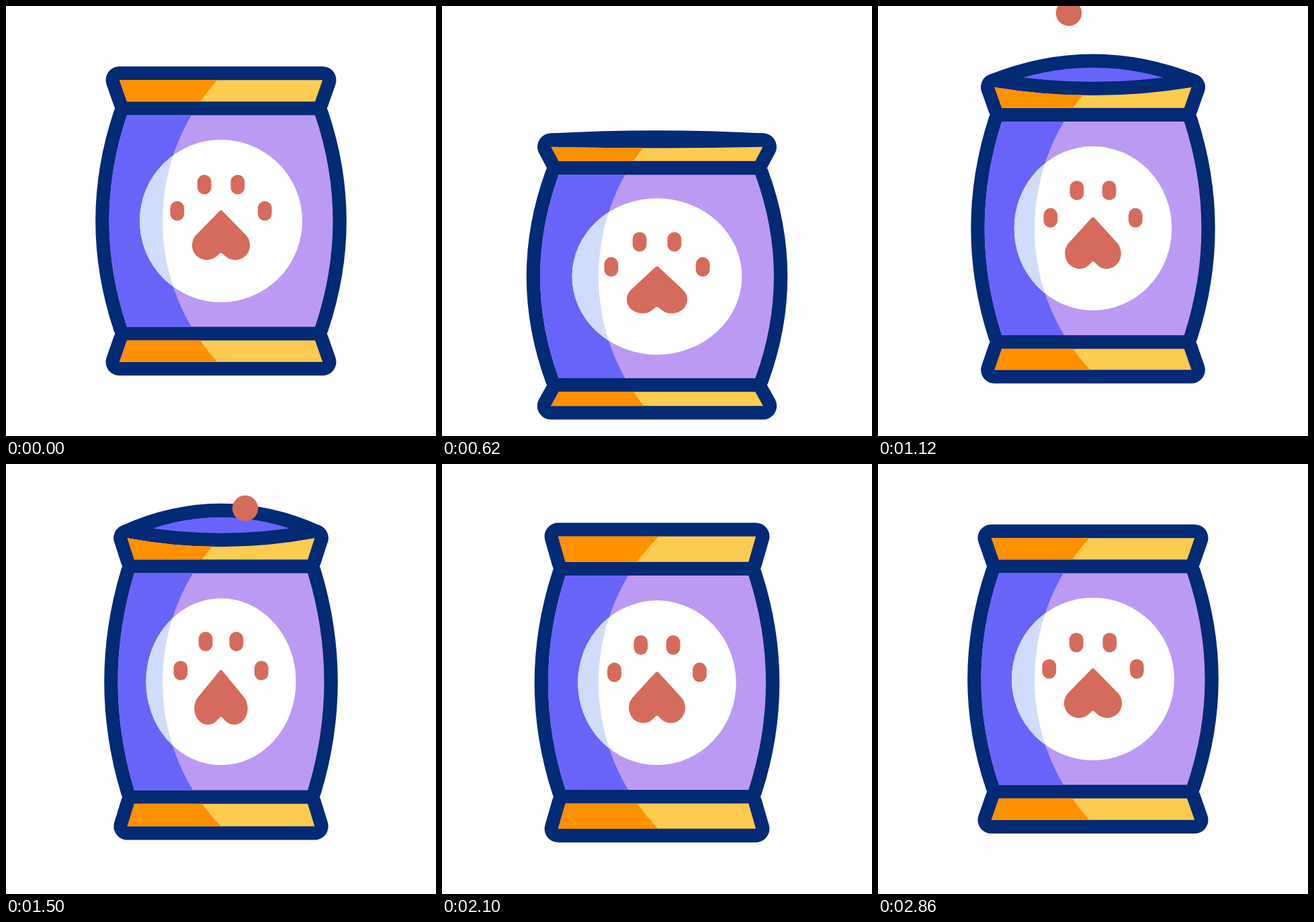
Recreate the animation shown at these times as an HTML page with a canvas. Size 640x640 px, loop 2.98 s.

```html
<!DOCTYPE html>
<html lang="en">
<head>
<meta charset="utf-8">
<title>Pet food bag</title>
<style>
  html, body { margin: 0; width: 100%; height: 100%; overflow: hidden; background: #fff; }
  canvas { display: block; width: 640px; height: 640px; }
</style>
</head>
<body>
<canvas id="stage" width="640" height="640"></canvas>
<script>
const ctx = document.getElementById('stage').getContext('2d');
const LOOP = 2980, MID = 320, LINE = 20.3;
const NAVY = '#032a75', BLUE = '#6964f9', PURPLE = '#bb9af3', ORANGE = '#ff9000',
      YELLOW = '#fdcb50', RED = '#d56b5c', PALE = '#d1dcfd', WHITE = '#fff';

// time, centre y, half width, half body height, bottom flap, top flap, mouth opening, top pinch
const POSES = [
  [0,    320,   166.5, 157.5,  32,   32,   0,   0],
  [200,  320,   166.5, 157.5,  32,   32,   0,   0],
  [400,  394.5, 170,   154,    25.5, 25.5, 0,   0],
  [540,  419,   175.5, 150,    20,   20,   0,   0],
  [740,  362,   168.5, 155.5,  24,   25,   .55, 2],
  [820,  349,   162,   158,    26.5, 30,   .82, 4],
  [980,  324,   153.5, 161.5,  33.5, 32,   1,   0],
  [1220, 335,   166,   157.5,  30,   30,   .9,  0],
  [1500, 324,   153.5, 161.5,  33.5, 32,   1,   0],
  [1780, 383,   175.5, 150,    20,   20,   .6,  0],
  [2060, 323,   160,   160.5,  38,   38,   .06, 0],
  [2100, 325.5, 162,   159.5,  37.5, 38,   0,   0],
  [2360, 369.5, 171.5, 152.5,  23,   23,   0,   0],
  [2540, 341.2, 170,   154.25, 27,   27,   0,   0],
  [2860, 320,   166.5, 157.5,  32,   32,   0,   0],
  [LOOP, 320,   166.5, 157.5,  32,   32,   0,   0]
];

// x, time of entry at the top edge, fall speed at entry
const BALLS = [[320, 752], [284, 1080], [356, 1395]];

// Smooth interpolation that never overshoots a pose
function slope(i, c) {
  const a = POSES[i - 1], b = POSES[i], d = POSES[i + 1];
  if (!a || !d) return 0;
  const m = (b[c] - a[c]) / (b[0] - a[0]), n = (d[c] - b[c]) / (d[0] - b[0]);
  return m * n > 0 ? 2 * m * n / (m + n) : 0;
}

function poseAt(t) {
  let i = 0;
  while (i < POSES.length - 2 && t >= POSES[i + 1][0]) i++;
  const a = POSES[i], b = POSES[i + 1], span = b[0] - a[0], u = (t - a[0]) / span;
  const ease = u * u * (3 - 2 * u);
  return a.slice(1).map((v, k) => {
    const c = k + 1;
    return v + (b[c] - v) * ease
      + span * u * (1 - u) * ((1 - u) * slope(i, c) - u * slope(i + 1, c));
  });
}

function outline(path) {
  ctx.strokeStyle = NAVY;
  ctx.lineWidth = LINE * 2;
  ctx.lineJoin = 'round';
  ctx.stroke(path);
}

function fill(path, color) {
  ctx.fillStyle = color;
  ctx.fill(path);
}

function fillShaded(path, light, dark, shade) {
  fill(path, light);
  ctx.save();
  ctx.clip(shade, 'evenodd');
  fill(path, dark);
  ctx.restore();
}

function flapPath(seamHalf, seamY, edgeHalf, edgeY, dip) {
  const p = new Path2D();
  p.moveTo(MID - seamHalf, seamY);
  p.lineTo(MID - edgeHalf, edgeY);
  p.quadraticCurveTo(MID, edgeY + 2 * dip, MID + edgeHalf, edgeY);
  p.lineTo(MID + seamHalf, seamY);
  p.closePath();
  return p;
}

function bodyPath(half, seam, cy, h) {
  const bulge = 2 * half - seam, p = new Path2D();
  p.moveTo(MID - seam, cy - h);
  p.lineTo(MID + seam, cy - h);
  p.quadraticCurveTo(MID + bulge, cy, MID + seam, cy + h);
  p.lineTo(MID - seam, cy + h);
  p.quadraticCurveTo(MID - bulge, cy, MID - seam, cy - h);
  p.closePath();
  return p;
}

function mouthPath(half, y, rise, dip) {
  const p = new Path2D();
  p.moveTo(MID - half, y);
  p.quadraticCurveTo(MID, y - 2 * rise, MID + half, y);
  p.quadraticCurveTo(MID, y + 2 * dip, MID - half, y);
  p.closePath();
  return p;
}

const HEART = new Path2D('M-2 -15 L-36.6 20.4 A22 22 0 0 0 -21 58 Q-12 58 -5.4 51.5 ' +
  'L-2 48.3 Q0 46.6 2 48.3 L5.4 51.5 Q12 58 21 58 A22 22 0 0 0 36.6 20.4 L2 -15 Q0 -16.8 -2 -15 Z');

function drawPaw(cy, sx) {
  const sy = Math.pow(sx, -1.2);
  ctx.save();
  ctx.translate(MID, cy);
  for (const [x, y] of [[65.2, -15], [24.8, -54.3]]) {
    for (const side of [-1, 1]) {
      const toe = new Path2D();
      toe.roundRect(side * x * sx - 10.4, y * sy - 14.5, 20.8, 29, 10.4);
      fill(toe, RED);
    }
  }
  ctx.scale(sx, sy);
  fill(HEART, RED);
  ctx.restore();
}

function drawBalls(t) {
  for (const [x, start] of BALLS) {
    const dt = t - start;
    if (dt < 0 || dt > 240) continue;
    const ball = new Path2D();
    ball.arc(x, -20 + .7 * dt + .00105 * dt * dt, 19.2, 0, Math.PI * 2);
    fill(ball, RED);
  }
}

function draw(t) {
  const [cy, half, h, low, high, open, pinch] = poseAt(t);
  const seam = half * .841, edge = half * .908, topEdge = edge - pinch;
  const topY = cy - h - LINE - high;

  const shade = new Path2D();
  shade.rect(0, 0, 640, 640);
  shade.arc(543, cy, 310, 0, Math.PI * 2);

  const mouth = mouthPath(topEdge, topY, 31 * open, 13 * open);
  const top = flapPath(seam, cy - h - LINE, topEdge, topY, 13 * open);
  const bottom = flapPath(seam, cy + h + LINE, edge, cy + h + LINE + low, 0);
  const body = bodyPath(half, seam, cy, h);
  const label = new Path2D();
  label.ellipse(MID, cy, 121 * half / 166.5, 121 * h / 157.5, 0, 0, Math.PI * 2);

  ctx.fillStyle = WHITE;
  ctx.fillRect(0, 0, 640, 640);

  if (open > 0) {
    outline(mouth);
    fill(mouth, BLUE);
  }
  drawBalls(t);

  [top, body, bottom].forEach(outline);
  fillShaded(top, YELLOW, ORANGE, shade);
  fillShaded(bottom, YELLOW, ORANGE, shade);
  fillShaded(body, PURPLE, BLUE, shade);
  fillShaded(label, WHITE, PALE, shade);
  drawPaw(cy, half / 166.5);
}

const begin = performance.now();
function tick() {
  draw((performance.now() - begin) % LOOP);
  requestAnimationFrame(tick);
}
tick();
</script>
</body>
</html>
```
